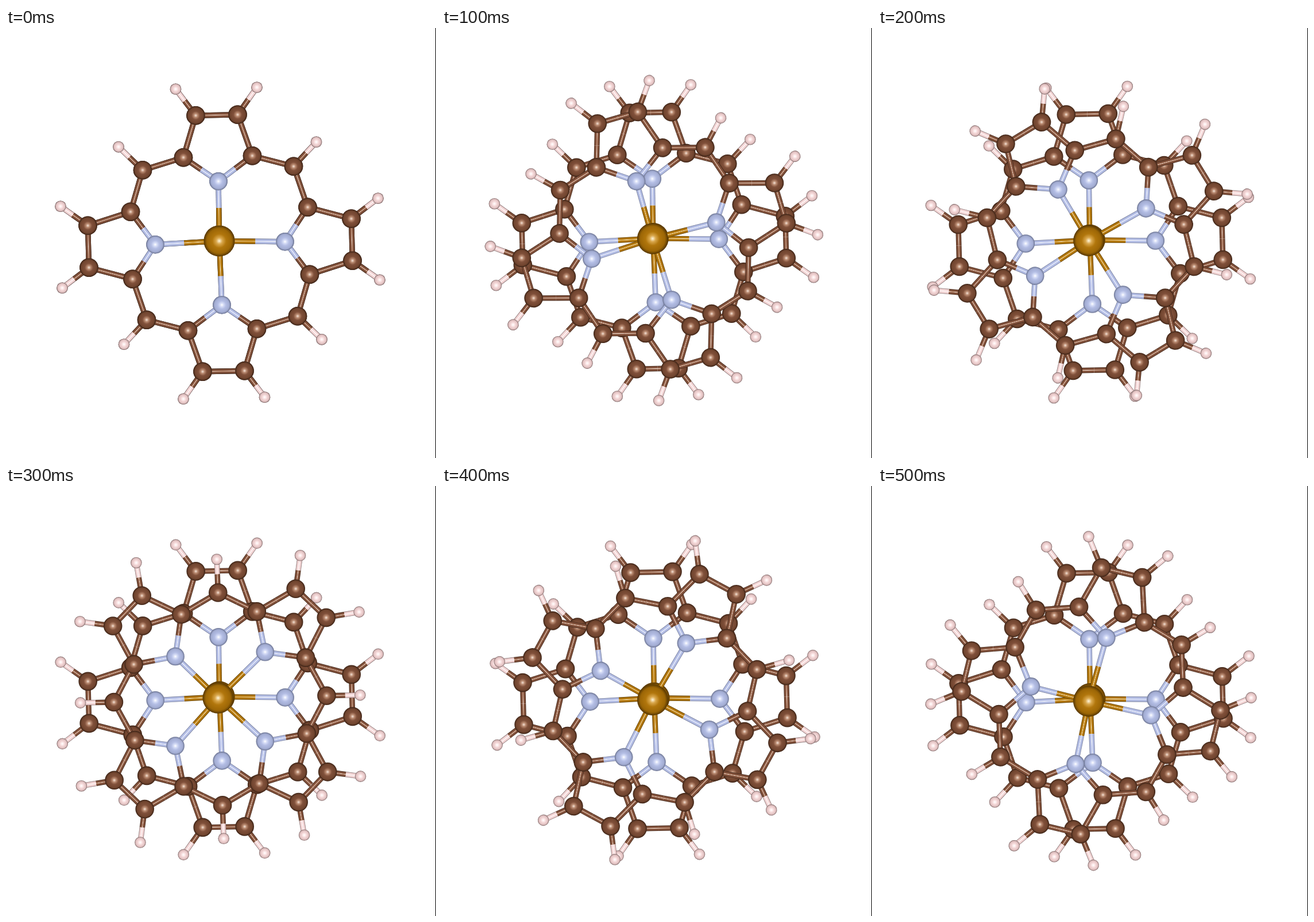
An HTML page with a canvas that plays this animation: 749 px wide and 748 px high, repeating every 0.6 s.

```html
<!DOCTYPE html>
<html lang="en">
<head>
<meta charset="utf-8">
<title>Stacked rings</title>
<style>
  html, body { margin: 0; width: 100%; height: 100%; overflow: hidden; background: #fff; }
  canvas { display: block; }
</style>
</head>
<body>
<canvas id="stage" width="749" height="748"></canvas>
<script>
const ctx = document.getElementById('stage').getContext('2d');
const STEP = 100, STEPS = 6, TURN = -Math.PI / 12;
const BOND = 4.7;
const CENTER = [373, 374.2];
const DRIFT = [[0, 0], [-3.7, -4.5], [-2.7, -1.7], [0.2, -3.8], [-2, -1.6], [-2, -0.4]];

// radius, then colours from highlight to rim
const KINDS = {
  C: { r: 16.3, tones: ['#f6e4d8', '#b98a70', '#80503a', '#71452f', '#3b2215'] },
  N: { r: 15.8, tones: ['#ffffff', '#d5dcf6', '#b3bde4', '#a3add3', '#6d7593'] },
  H: { r: 9.8, tones: ['#ffffff', '#fdeeee', '#f3d6d6', '#dfbfbf', '#7d6666'] },
  M: { r: 27, tones: ['#fff6dc', '#d9a74c', '#b1760c', '#9c6606', '#553600'] }
};
const SPHERE_STOPS = [0, 0.2, 0.45, 0.8, 1];

// Two neighbouring quarters; the other two follow by a half turn.
const QUARTERS = [
  { ring: [[-64, -149], [-42.5, -222], [30.5, -223.5], [56, -152], [128, -133.5]],
    n: [-3, -107.5], h: [[-77.5, -268], [64, -271], [167.5, -176]] },
  { ring: [[152.5, -62.5], [228.5, -42.5], [230.5, 30.5], [156, 54.5], [135, 127]],
    n: [113, -2.5], h: [[275, -78], [278, 64], [177, 167.5]] }
];

const atoms = [], bonds = [];

function atom(kind, [x, y], sign = 1) {
  const a = { kind, x: x * sign, y: y * sign };
  atoms.push(a);
  return a;
}

function build() {
  const metal = atom('M', [-1.5, -3.8]);
  const chain = [];
  for (const sign of [1, -1]) {
    for (const q of QUARTERS) {
      const ring = q.ring.map(p => atom('C', p, sign));
      const n = atom('N', q.n, sign);
      bonds.push([metal, n], [n, ring[0]], [n, ring[3]]);
      [1, 2, 4].forEach((k, i) => bonds.push([ring[k], atom('H', q.h[i], sign)]));
      chain.push(...ring);
    }
  }
  chain.forEach((a, i) => bonds.push([a, chain[(i + 1) % chain.length]]));
}

function rod(tones, from, to) {
  const g = ctx.createLinearGradient(0, -BOND, 0, BOND);
  const [shine, light, base, , rim] = tones;
  [[0, rim], [0.16, base], [0.36, base], [0.45, light], [0.5, shine],
   [0.55, light], [0.64, base], [0.84, base], [1, rim]].forEach(s => g.addColorStop(...s));
  ctx.fillStyle = g;
  ctx.fillRect(from, -BOND, to - from, 2 * BOND);
}

function drawBond([a, b]) {
  const dx = b.x - a.x, dy = b.y - a.y, len = Math.hypot(dx, dy);
  const A = KINDS[a.kind], B = KINDS[b.kind];
  const split = (len + A.r - B.r) / 2;
  ctx.save();
  ctx.translate(a.x, a.y);
  ctx.rotate(Math.atan2(dy, dx));
  rod(A.tones, 0, split);
  rod(B.tones, split, len);
  ctx.restore();
}

function drawAtom({ kind, x, y }) {
  const { r, tones } = KINDS[kind];
  const g = ctx.createRadialGradient(x, y, 0, x, y, r);
  tones.forEach((c, i) => g.addColorStop(SPHERE_STOPS[i], c));
  ctx.fillStyle = g;
  ctx.beginPath();
  ctx.arc(x, y, r, 0, 2 * Math.PI);
  ctx.fill();
}

function drawMolecule([dx, dy], angle) {
  ctx.save();
  ctx.translate(CENTER[0] + dx, CENTER[1] + dy);
  ctx.rotate(angle);
  bonds.forEach(drawBond);
  atoms.forEach(drawAtom);
  ctx.restore();
}

function draw() {
  const step = Math.floor(performance.now() / STEP) % STEPS;
  ctx.fillStyle = '#fff';
  ctx.fillRect(0, 0, 749, 748);
  drawMolecule(DRIFT[step], 0);
  drawMolecule(DRIFT[step], step * TURN);
  ctx.fillStyle = '#000';
  ctx.fillRect(748, 0, 1, 748);
  requestAnimationFrame(draw);
}

build();
draw();
</script>
</body>
</html>
```
